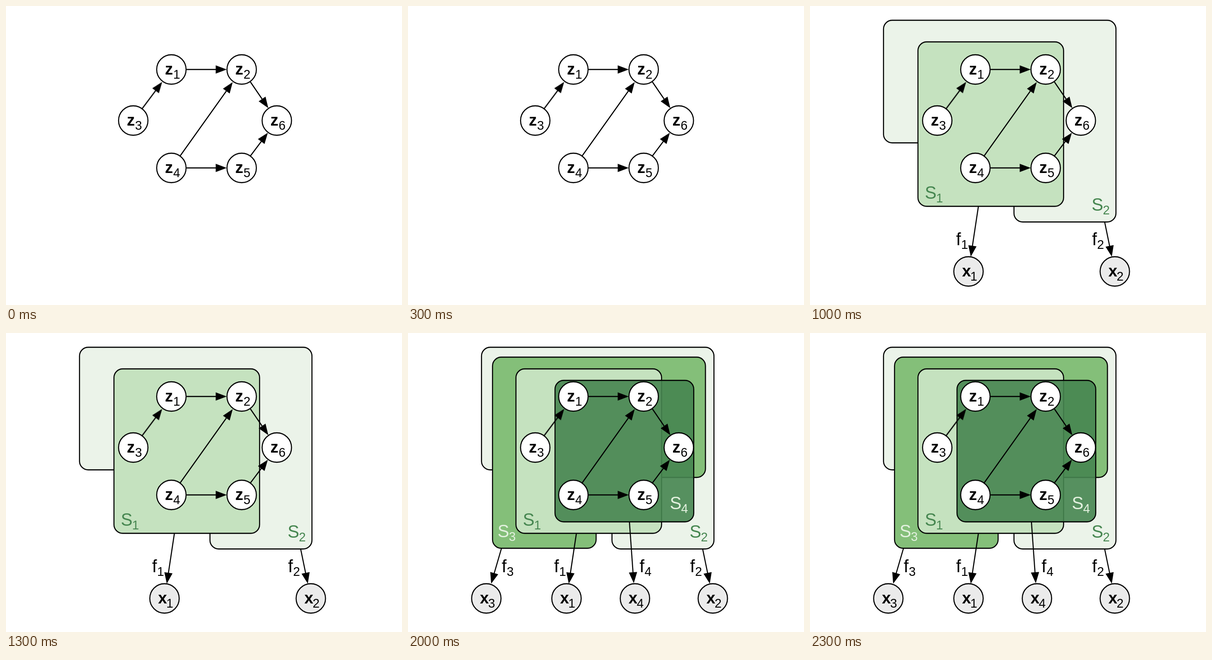
An HTML page for the animation above (2500 ms loop, 862x650 px).

```html
<!DOCTYPE html>
<html lang="en">
<head>
<meta charset="utf-8">
<title>Latent graph</title>
<style>
  html, body { margin: 0; width: 100%; height: 100%; overflow: hidden; background: #fff; }
  svg { display: block; width: 100vw; height: 100vh; }
  text { font-family: "Liberation Sans", Arial, sans-serif; }
</style>
</head>
<body>
<svg id="stage" viewBox="0 0 862 650"></svg>
<script>
const LOOP = 2500, STEP = 500;
const NS = "http://www.w3.org/2000/svg";
const stage = document.getElementById("stage");
const GREEN = "#468650", PALE = "#e3f1df";

function add(parent, tag, attrs, content) {
  const el = document.createElementNS(NS, tag);
  for (const key in attrs) el.setAttribute(key, attrs[key]);
  if (content) el.textContent = content;
  return parent.appendChild(el);
}

// A layer that switches on at the given step and stays until the loop ends.
function layer(step) {
  const g = add(stage, "g", {});
  if (step) {
    const offset = step * STEP / LOOP;
    g.animate([
      { opacity: 0, offset: 0 }, { opacity: 0, offset },
      { opacity: 1, offset }, { opacity: 1, offset: 1 }
    ], { duration: LOOP, iterations: Infinity });
  }
  return g;
}

function label(g, letter, sub, x, y, { size = 38, gap, drop = 8, weight = 400, fill = "#000" }) {
  add(g, "text", { x, y, fill, "font-size": size, "font-weight": weight }, letter);
  add(g, "text", { x: x + gap, y: y + drop, fill, "font-size": 27 }, sub);
}

function node(g, letter, sub, x, y, fill) {
  add(g, "circle", { cx: x, cy: y, r: 32, fill, stroke: "#000", "stroke-width": 2.3 });
  label(g, letter, sub, x - 14, y + 11, { size: 35, gap: 18, drop: 9, weight: 700 });
}

function arrow(g, x1, y1, x2, y2) {
  const len = Math.hypot(x2 - x1, y2 - y1);
  const turn = Math.atan2(y2 - y1, x2 - x1) * 180 / Math.PI;
  const a = add(g, "g", { transform: `translate(${x1} ${y1}) rotate(${turn})` });
  add(a, "path", { d: `M0 0H${len - 20}`, stroke: "#000", "stroke-width": 2.3 });
  add(a, "path", { d: `M${len} 0l-24 -9v18z` });
}

// Polygon with every corner rounded.
function region(g, points, fill, opacity = 1) {
  const n = points.length, r = 19;
  const toward = ([ax, ay], [bx, by]) => {
    const k = r / Math.hypot(bx - ax, by - ay);
    return [ax + (bx - ax) * k, ay + (by - ay) * k];
  };
  const d = points.map((p, i) => {
    const start = toward(p, points[(i + n - 1) % n]);
    const end = toward(p, points[(i + 1) % n]);
    const [ux, uy] = [p[0] - start[0], p[1] - start[1]];
    const [vx, vy] = [end[0] - p[0], end[1] - p[1]];
    const sweep = ux * vy - uy * vx > 0 ? 1 : 0;
    return `${i ? "L" : "M"}${start}A${r} ${r} 0 0 ${sweep} ${end}`;
  }).join("") + "Z";
  add(g, "path", { d, fill, "fill-opacity": opacity, stroke: "#000", "stroke-width": 2.3 });
}

const box = (l, t, r, b) => [[l, t], [r, t], [r, b], [l, b]];

// Listed back to front; step is when the region appears.
const sets = [
  { id: 2, step: 2, fill: "#ebf3e9", ink: GREEN, at: [613, 445],
    shape: [[160, 31], [666, 31], [666, 469.5], [444, 469.5], [444, 297.5], [160, 297.5]],
    link: [641.5, 470, 657, 545], f: [614, 520], x: 663.5 },
  { id: 3, step: 3, fill: "#84bf79", ink: PALE, at: [195, 443.5],
    shape: [[184, 52.5], [647.5, 52.5], [647.5, 314], [409.5, 314], [409.5, 468], [184, 468]],
    link: [203.5, 468, 181, 545], f: [204, 520], x: 170.5 },
  { id: 1, step: 1, fill: "#c5e2bf", ink: GREEN, at: [250, 419],
    shape: box(235, 78, 552, 435.5),
    link: [366.5, 436, 350, 545], f: [318, 520], x: 345 },
  { id: 4, step: 4, fill: GREEN, opacity: .9, ink: PALE, at: [570, 383],
    shape: box(320, 103, 622, 410.5),
    link: [482, 411, 491.5, 544], f: [504, 520], x: 494 }
];

for (const s of sets) {
  const g = layer(s.step);
  region(g, s.shape, s.fill, s.opacity);
  label(g, "S", s.id, ...s.at, { gap: 24.5, fill: s.ink });
}
for (const s of sets) {
  const g = layer(s.step);
  arrow(g, ...s.link);
  label(g, "f", s.id, ...s.f, { gap: 11 });
  node(g, "x", s.id, s.x, 577, "#ebebeb");
}

const graph = layer(0);
[
  [392, 138, 480.5, 138], [392, 352, 480.5, 352],
  [296.5, 223, 340, 165], [379, 326, 493.5, 165.5],
  [532, 165, 571, 222], [532, 326, 570, 275.5]
].forEach(a => arrow(graph, ...a));
[[360, 138], [513, 138], [277, 249], [360, 352], [513, 352], [589.5, 249]]
  .forEach(([x, y], i) => node(graph, "z", i + 1, x, y, "#fff"));

// Keep every layer on the same clock.
const anims = document.getAnimations();
const t0 = document.timeline.currentTime || 0;
anims.forEach(a => { a.startTime = t0; });
</script>
</body>
</html>
```
